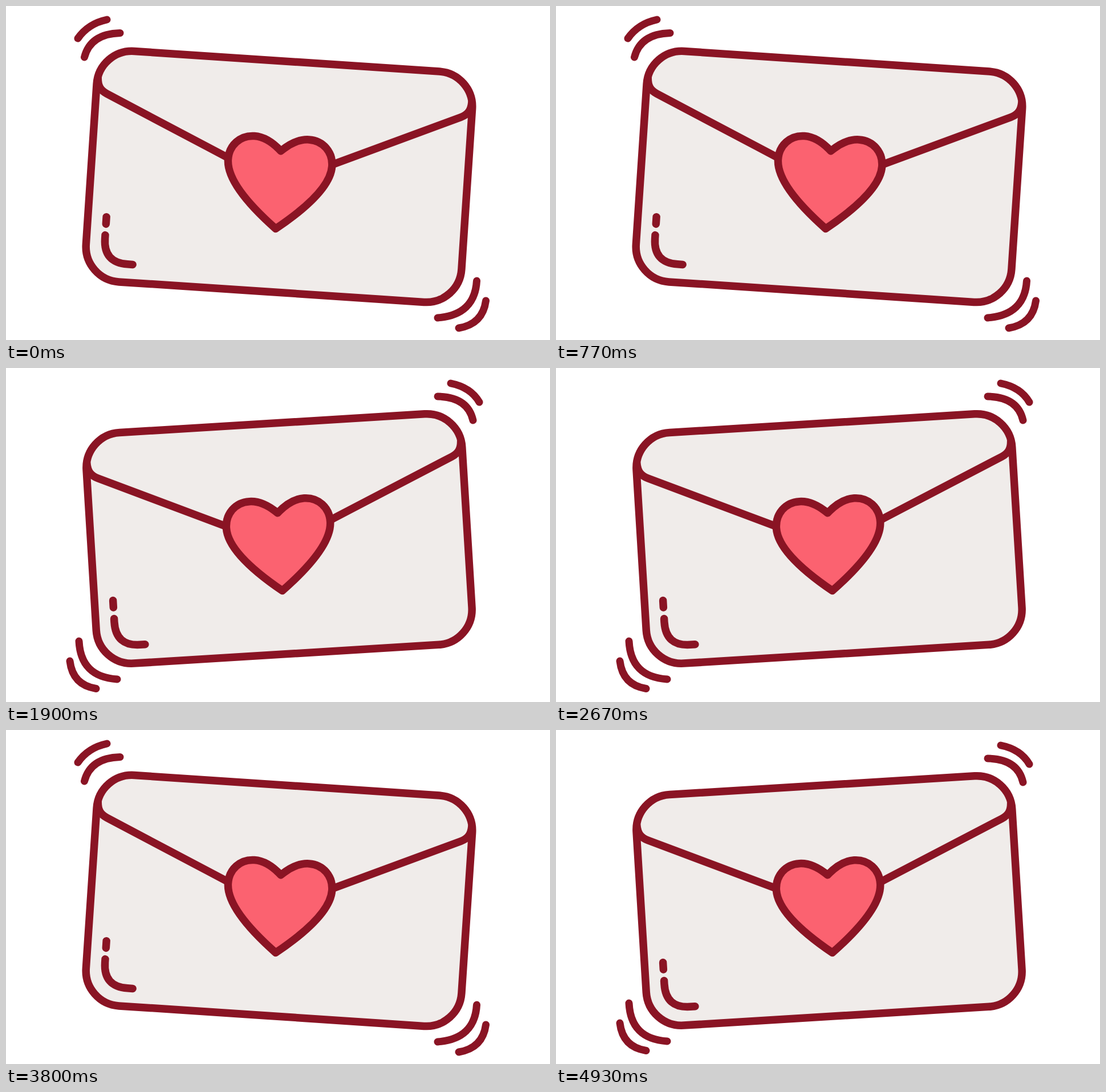
These frames come from a looping animation (954x587 px, 5310 ms). An HTML page:

```html
<!DOCTYPE html>
<html lang="en">
<head>
<meta charset="utf-8">
<title>Shaking love letter</title>
<style>
  html, body { margin: 0; width: 100%; height: 100%; overflow: hidden; background: #fff; }
  svg { display: block; width: 100vw; height: 100vh; }
  g { fill: none; stroke: #8a1424; stroke-linecap: round; stroke-linejoin: round; }
</style>
</head>
<body>
<svg viewBox="0 0 954 587">
  <g id="envelope" stroke-width="13.5">
    <rect x="-330" y="-202.8" width="660" height="406.3" rx="62" fill="#f0ecea"/>
    <path d="M-328.5-152C-328-138-323-130.5-311-125L-94-28"/>
    <path d="M328.5-152C328-138 323-130.5 311-125L94-28"/>
    <path d="M-297.5 91V103.5M-297.5 123V129Q-297.5 171.5-255 171.5H-246"/>
    <path fill="#fb6270" d="M0-44.8C-14-58-30-68-48-68C-73-68-91.3-49-91.3-24C-91.3 12-49 54 0 92
      C49 54 91.3 12 91.3-24C91.3-49 73-68 48-68C30-68 14-58 0-44.8Z"/>
  </g>
  <g stroke-width="13"><path id="shake"/></g>
</svg>
<script>
  const LOOP = 5310;
  const SWITCHES = [370, 770, 1130, 1530, 1900, 2300, 2670, 3070, 3400, 3800, 4170, 4570, 4930];
  const POSES = [
    { angle: 3.8,
      marks: 'M126 57Q144 31 177 24M137.5 90Q148 49 200 47.5' +
             'M825.5 483Q822 543 757 548M841.5 518Q836 559 794 566' },
    { angle: -3.5,
      marks: 'M780 27Q815 34 830 60M757 50Q810 51 819 92' +
             'M128 480Q131 543 195 547M112 515Q117 557 158 563.5' }
  ];
  const envelope = document.getElementById('envelope');
  const shake = document.getElementById('shake');

  function draw(time) {
    const switched = SWITCHES.filter(at => at <= time).length;
    const pose = POSES[switched % 2];
    envelope.setAttribute('transform', `translate(479 299.6) rotate(${pose.angle})`);
    shake.setAttribute('d', pose.marks);
  }

  const start = performance.now();
  function tick(now) {
    draw(Math.max(0, now - start) % LOOP);
    requestAnimationFrame(tick);
  }
  draw(0);
  requestAnimationFrame(tick);
</script>
</body>
</html>
```
